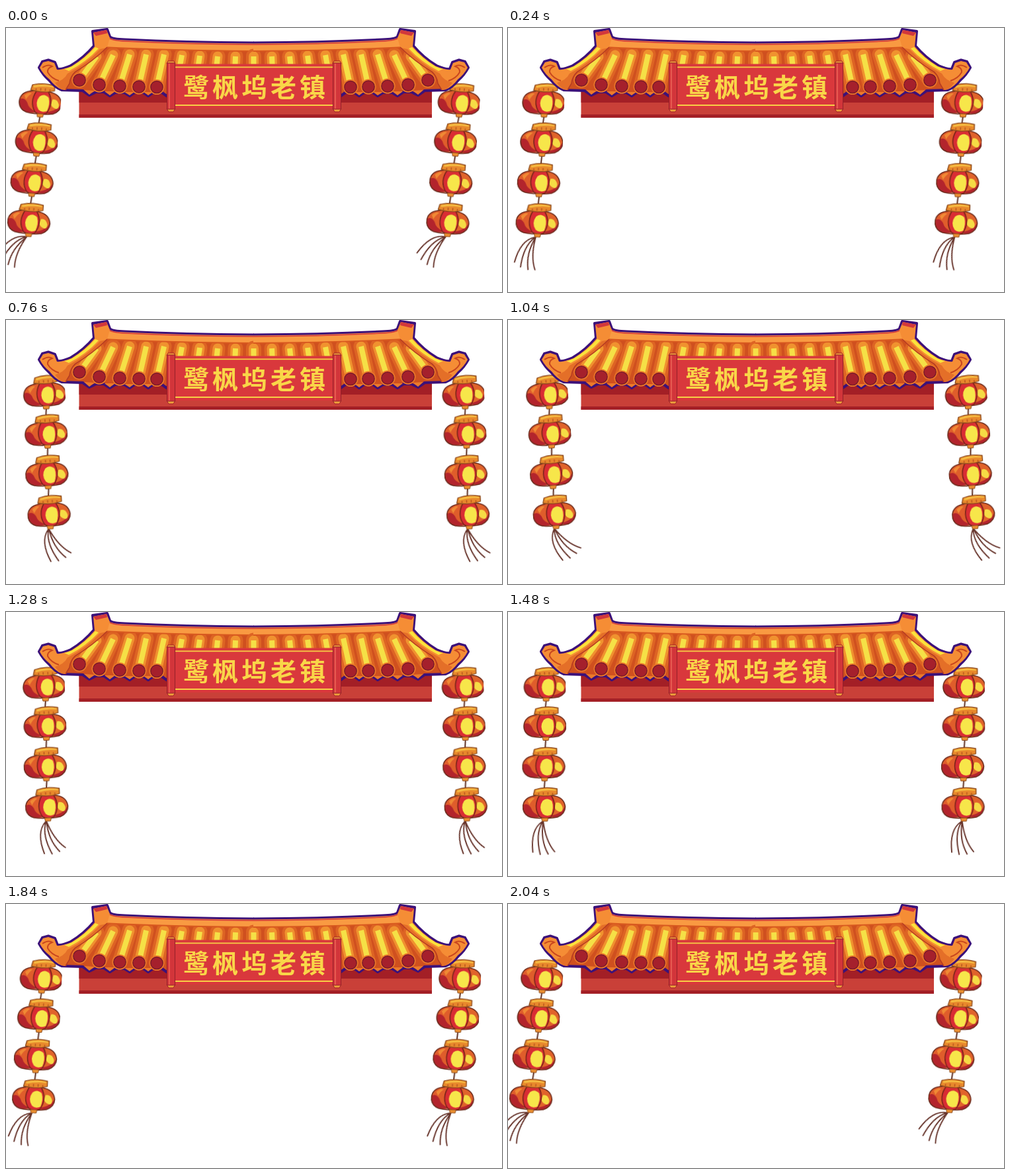
Animation, 750 px wide and 400 px high, one loop 2.08 s. Source, as an HTML page without scripts:

```html
<!DOCTYPE html>
<html lang="zh">
<head>
<meta charset="utf-8">
<title>Lantern gate</title>
<style>
html, body { margin: 0; width: 100%; height: 100%; overflow: hidden; background: #fff; }
svg { display: block; width: 750px; height: 400px; }
.sway { transform-origin: 55px 61px; animation: sway 2080ms infinite; }
.fringe { transform-origin: 50px 317px; animation: fringe 2080ms infinite; }
@keyframes sway {
  0% { transform: rotate(4.4deg); animation-timing-function: steps(24, end); }
  46.1538% { transform: rotate(-5.05deg); animation-timing-function: steps(27, end); }
  98.0769%, 100% { transform: rotate(4.4deg); }
}
@keyframes fringe {
  0% { transform: rotate(35deg); animation-timing-function: steps(24, end); }
  46.1538% { transform: rotate(-37deg); animation-timing-function: steps(27, end); }
  98.0769%, 100% { transform: rotate(35deg); }
}
.name { font: 700 39px "Noto Sans CJK SC", "Noto Sans CJK", sans-serif; letter-spacing: 5px; fill: #f9d648; }
</style>
</head>
<body>
<svg viewBox="0 0 750 400">
<defs>
  <clipPath id="crop"><rect x="20.5" y="70" width="66.5" height="260"/></clipPath>

  <g id="lantern" stroke-linejoin="round">
    <!-- side lobes -->
    <path d="M-12-17Q-31-15-32 0Q-32 12-20 16Q-10 18-4 15L-4-17Z" fill="#df5d2b"/>
    <path d="M-31-3Q-33 13-19 16Q-10 17-6 14Q-17 11-20 1Q-25-6-31-3Z" fill="#b3242c"/>
    <path d="M-25-9Q-19-15-14-13Q-20-8-22-3Z" fill="#f08a35"/>
    <path d="M12-17Q30-15 32 0Q32 11 20 16Q10 18 4 15L4-17Z" fill="#e0632b"/>
    <path d="M31 0Q32 11 20 16Q12 17 8 14Q20 12 24 8Q30 4 31 0Z" fill="#b3242c"/>
    <path d="M18-6Q25-8 28 1Q29 8 24 8Q17 6 16 1Z" fill="#f6dc45"/>
    <path d="M-12-17Q-31-15-32 0Q-32 12-20 16Q-10 18 0 17Q10 18 20 16Q32 11 32 0Q30-15 12-17" fill="none" stroke="#6b2a1c" stroke-width="1.6"/>
    <!-- middle lobe -->
    <path d="M-7-17Q-17 0-7 15Q0 20 10 16Q21 0 11-17Z" fill="#d92d33" stroke="#7a2419" stroke-width="1.6"/>
    <path d="M8-15Q17 0 9 14Q13 6 13-1Q13-9 8-15Z" fill="#e8702d"/>
    <path d="M-2-9Q5-15 12-8Q15 1 11 12Q4 16-2 11Q-9 1-2-9Z" fill="#f7e64a"/>
    <!-- cap and knob -->
    <path d="M-14-26Q2-31 20-27L20-19Q3-14-16-18Z" fill="#e8892c" stroke="#8a4a1c" stroke-width="1.3"/>
    <path d="M-12-25Q2-29 18-26L18-24Q2-26-12-22Z" fill="#f5bd42"/>
    <path d="M-8-21v3M-1-22v4M6-22v4M13-21v3" stroke="#bd5a20" stroke-width="1.6"/>
    <path d="M-4 17H6L5 22H-3Z" fill="#ec8f30" stroke="#8a4a1c" stroke-width="1"/>
  </g>

  <g id="strand" clip-path="url(#crop)">
    <path d="M57 134L56 144M56 193L55 206M54 255L53 267" stroke="#5e2f22" stroke-width="2"/>
    <use href="#lantern" x="56" y="113"/>
    <use href="#lantern" x="55" y="172.5"/>
    <use href="#lantern" x="52.5" y="234"/>
    <use href="#lantern" x="52.5" y="295"/>
  </g>

  <path id="threads" d="M49 318Q31 329 33 363M50 318Q38 335 44 367M51 318Q45 345 56 367M51 317Q53 347 66 364" fill="none" stroke="#66332a" stroke-width="1.9" stroke-linecap="round"/>

  <path id="tubes" d="M137 43L111 79M162 41L141 86M187 40L172 88M212 40L201 89M239 40L228 89M266 41L257 89M293 42L286 89M320 43L315 89M347 43L345 89M374.5 43V89"/>

  <g id="cap"><circle r="11.5" fill="#ea7429"/><circle r="9.2" fill="#a5202c" stroke="#75182a" stroke-width="1.3"/></g>

  <g id="half">
    <path d="M375 22.5Q270 22 180 17.5Q160 17 157 13L153 2L131 5L133 27Q118 45 98 57Q84 63 78 62L74 52L64 48.5L55 51L50 60Q56 71 65 79Q74 90 84 94L116 95L126 102L136 97H148L157 103L165 98H179L187 103L194 98H208L215 103L222 98H236L243 103L250 98H375" fill="#cf501f" stroke="#3c1179" stroke-width="4" stroke-linejoin="round"/>
    <use href="#tubes" fill="none" stroke="#dd6424" stroke-width="23" stroke-linecap="round"/>
    <use href="#tubes" fill="none" stroke="#f0922f" stroke-width="15" stroke-linecap="round"/>
    <use href="#tubes" fill="none" stroke="#f5e046" stroke-width="8"/>
    <path d="M118 94L126 101L134 95ZM149 96L157 102L165 96ZM179 97L187 102L194 97ZM208 97L215 102L222 97Z" fill="#ec7a2a"/>
    <use href="#cap" x="111" y="79"/>
    <use href="#cap" x="141" y="86"/>
    <use href="#cap" x="172" y="88"/>
    <use href="#cap" x="201" y="89"/>
    <use href="#cap" x="228" y="89.5"/>
    <!-- ridge and hip -->
    <path d="M375 23.5Q270 23 180 18.5Q160 18 156 14L146 29Q250 34 375 35Z" fill="#f99a42"/>
    <path d="M146 29Q250 34 375 35" fill="none" stroke="#d8591f" stroke-width="1.8"/>
    <path d="M375 25Q270 24.5 180 20Q160 19 156 15" fill="none" stroke="#d2373c" stroke-width="1.6"/>
    <path d="M132 7L152 3L157 15L153 29Q132 50 104 67Q97 74 96 84L90 94L84 93Q74 89 66 78Q56 70 51 60L56 52L64 50L73 53L77 63Q84 64 99 58Q120 45 134 28Z" fill="#f58d35"/>
    <path d="M152 30Q132 50 104 67Q97 74 96 84L90 94L84 93Q78 89 74 83Q88 79 93 69Q122 54 142 32Z" fill="#e46f28"/>
    <path d="M135 29Q120 46 100 58Q94 61 88 62L95 65Q122 51 140 31Z" fill="#fae33c"/>
    <path d="M132 7L152 3L153 8L136 12Z" fill="#d2373c"/>
    <path d="M55 60Q64 54 70 58Q62 61 63 67Q68 76 80 80" fill="none" stroke="#c9471f" stroke-width="2"/>
    <path d="M153 29Q132 50 104 67Q97 74 96 84L90 94" fill="none" stroke="#b63c22" stroke-width="1.5"/>
  </g>

  <g id="roller">
    <path d="M243 54L245 50H254L256 54ZM243 122H256L253 127H246Z" fill="#f0a23b" stroke="#a32228" stroke-width="1"/>
    <rect x="243.5" y="53" width="12" height="70" fill="#d2353a" stroke="#94202a"/>
    <path d="M247 54V122" stroke="#e65a50" stroke-width="2"/>
  </g>
</defs>

<g class="sway">
  <g class="fringe"><use href="#threads"/></g>
  <use href="#strand"/>
</g>
<g transform="translate(633.5)">
  <g class="sway">
    <g class="fringe"><use href="#threads"/></g>
    <use href="#strand"/>
  </g>
</g>

<rect x="110.5" y="96" width="533.5" height="40" fill="#c94038"/>
<rect x="110.5" y="96" width="533.5" height="17" fill="#a31f26"/>
<rect x="110.5" y="131" width="533.5" height="5" fill="#a31f26"/>

<use href="#half"/>
<use href="#half" transform="matrix(-1 0 0 1 749 0)"/>

<rect x="255" y="54.5" width="240" height="67.5" fill="#d9383c"/>
<path d="M255 59.3H495M255 117H495" stroke="#f7cf45" stroke-width="1.8"/>
<use href="#roller"/>
<use href="#roller" x="251"/>
<text class="name" x="268" y="103.5">鹭枫坞老镇</text>
</svg>
</body>
</html>
```
